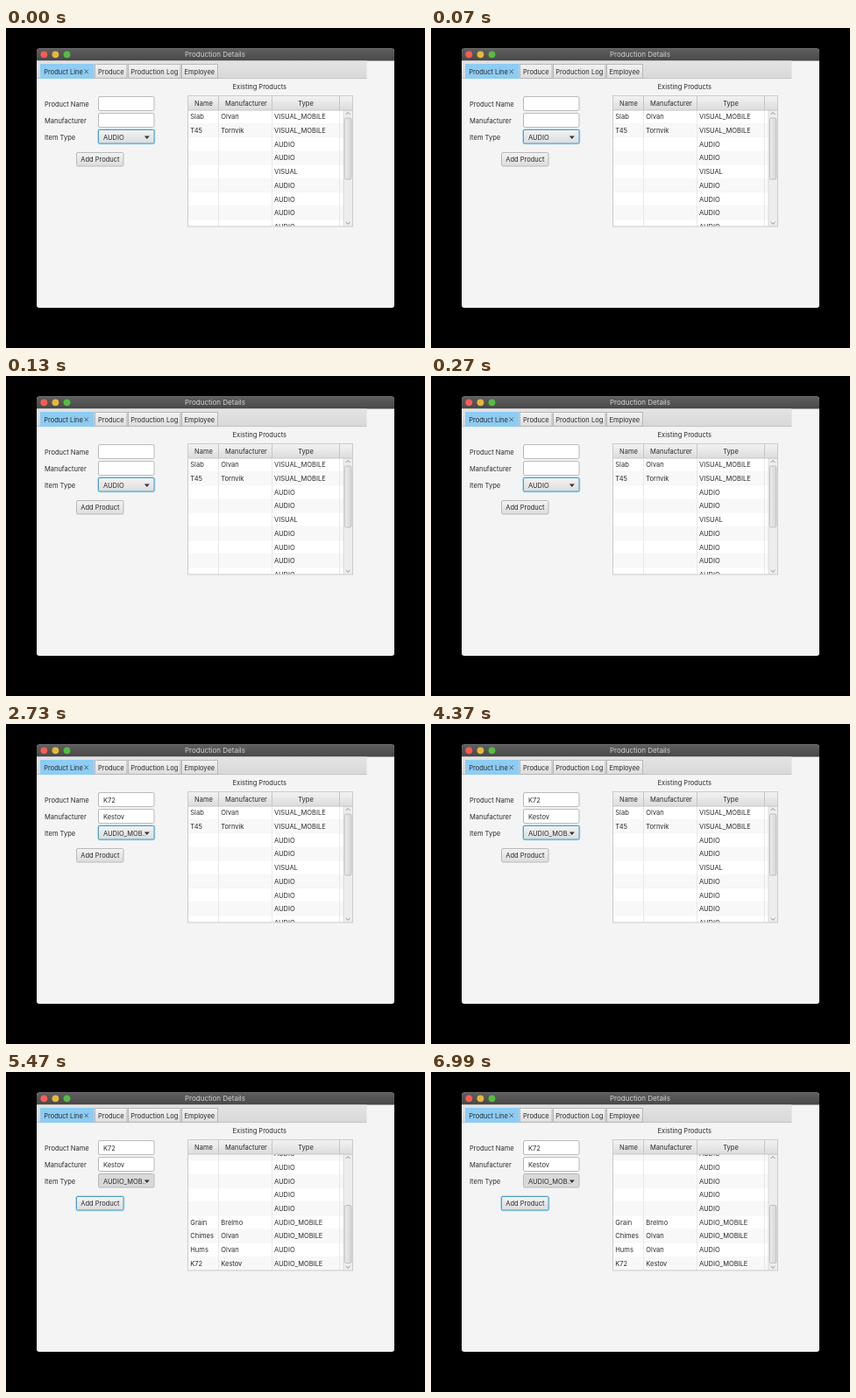
Recreate the animation shown at these times as an HTML page. Size 478x366 px, loop 8 s.

```html
<!DOCTYPE html>
<html lang="en">
<head>
<meta charset="utf-8">
<title>Production Details</title>
<style>
  html, body { margin: 0; width: 100%; height: 100%; overflow: hidden; background: #000; }
  svg { display: block; width: 478px; height: 366px; }
  text { font: 7.5px Inter, "Open Sans", sans-serif; fill: #2b2b2b; }
  .title { font-size: 8px; fill: #d2d2d2; }
  .mid { text-anchor: middle; }
</style>
</head>
<body>
<svg id="stage" viewBox="0 0 478 366">
  <defs>
    <linearGradient id="bar" x2="0" y2="1"><stop stop-color="#606060"/><stop offset="1" stop-color="#484848"/></linearGradient>
    <linearGradient id="strip" x2="0" y2="1"><stop stop-color="#e3e3e3"/><stop offset="1" stop-color="#d8d8d8"/></linearGradient>
    <linearGradient id="face" x2="0" y2="1"><stop stop-color="#f3f3f3"/><stop offset="1" stop-color="#dcdcdc"/></linearGradient>
    <linearGradient id="thumb"><stop stop-color="#ececec"/><stop offset="1" stop-color="#d6d6d6"/></linearGradient>
    <clipPath id="rowsClip"><rect x="207" y="94" width="188" height="133"/></clipPath>
    <clipPath id="win"><rect x="35" y="23.5" width="408" height="296.5" rx="3"/></clipPath>
  </defs>
  <g id="chrome" clip-path="url(#win)"></g>
  <g id="form"></g>
  <g id="table"></g>
</svg>
<script>
const LOOP = 8000;
const STATES = [
  { at: 0, name: "", maker: "", type: "AUDIO", focus: "combo", scroll: 0, thumb: [103, 70], count: 13 },
  { at: 2730, name: "K72", maker: "Kestov", type: "AUDIO_MOB..", focus: "combo", scroll: 0, thumb: [103, 70], count: 13 },
  { at: 5470, name: "K72", maker: "Kestov", type: "AUDIO_MOB..", focus: "button", scroll: 86.6, thumb: [152.5, 66], count: 14 }
];
const audio = ["", "", "AUDIO"];
const PRODUCTS = [
  ["Slab", "Olvan", "VISUAL_MOBILE"],
  ["T45", "Tornvik", "VISUAL_MOBILE"],
  audio, audio, ["", "", "VISUAL"], audio, audio, audio, audio, audio,
  ["Grain", "Brelmo", "AUDIO_MOBILE"],
  ["Chimes", "Olvan", "AUDIO_MOBILE"],
  ["Hums", "Olvan", "AUDIO"],
  ["K72", "Kestov", "AUDIO_MOBILE"]
];
const ROW = 15.7, TOP = 93.8;

const $ = id => document.getElementById(id);
const rect = (x, y, w, h, fill, extra = "") =>
  `<rect x="${x}" y="${y}" width="${w}" height="${h}" fill="${fill}" ${extra}/>`;
const path = (d, extra) => `<path d="${d}" ${extra}/>`;
// y is the vertical centre of the line
const text = (x, y, s, cls = "") => `<text x="${x}" y="${y + 2.7}" class="${cls}">${s}</text>`;
const edge = color => `stroke="${color}" stroke-width="1"`;

function control(x, y, w, h, fill, focused) {
  const glow = focused
    ? rect(x - .3, y - .3, w + .6, h + .6, "none", 'rx="2" stroke="#a9d9ee" stroke-width="2"') : "";
  return glow + rect(x, y, w, h, fill, `rx="1.5" ${edge(focused ? "#4d9fc4" : "#b9b9b9")}`);
}

function drawChrome() {
  const lights = ["#f95c54", "#e4b93a", "#55bd43"]
    .map((c, i) => `<circle cx="${43.3 + 13.1 * i}" cy="30.3" r="3.9" fill="${c}"/>`).join("");
  const tabs = [[101.5, 36.5, "Produce", 105], [139.5, 59.5, "Production Log", 142.3], [200.5, 41, "Employee", 203.5]]
    .map(([x, w, label, tx]) => rect(x, 41.5, w, 16, "url(#face)", edge("#b8b8b8")) + text(tx, 50, label)).join("");
  $("chrome").innerHTML =
    rect(35, 23, 408, 297, "#f4f4f4") +
    rect(35, 23, 408, 14.5, "url(#bar)") + lights +
    text(238.5, 30.5, "Production Details", "title mid") +
    rect(35, 37.5, 376.5, 20.5, "url(#strip)") +
    path("M35 57.6H411.5", edge("#c4c4c4")) +
    rect(39, 41, 61.5, 17, "#8dccf3") +
    text(43.2, 50, "Product Line") +
    path("M89.5 47.4l4.4 4.8m0 -4.8l-4.4 4.8", 'stroke="#4a5962" stroke-width=".9"') + tabs;
}

function drawForm(s) {
  const onCombo = s.focus === "combo";
  $("form").innerHTML =
    text(44, 87, "Product Name") + text(44, 106, "Manufacturer") + text(44, 125, "Item Type") +
    control(105.5, 78.5, 63.5, 16, "#fff") + text(111, 87, s.name) +
    control(105.5, 97.5, 63.5, 16, "#fff") + text(111, 106, s.maker) +
    control(105.5, 116.5, 63.5, 15.5, onCombo ? "url(#face)" : "#d9d9d9", onCombo) +
    text(111, 125, s.type) +
    path("M157.8 123.6h6l-3 3.4z", 'fill="#333"') +
    control(80.5, 142.5, 53.5, 15.5, "url(#face)", !onCombo) +
    text(85.3, 150.5, "Add Product");
}

function drawTable(s) {
  const rows = PRODUCTS.slice(0, s.count).map((cells, i) => {
    const y = TOP + i * ROW - s.scroll;
    return rect(207, y, 178, ROW, i % 2 ? "#f8f8f8" : "#fff") +
      path(`M207 ${y + ROW}H385`, 'stroke="#f0f0f0" stroke-width=".6"') +
      cells.map((c, k) => text([210.3, 245.3, 306][k], y + ROW / 2, c)).join("");
  }).join("");
  const [ty, th] = s.thumb;
  $("table").innerHTML =
    text(289.3, 67.5, "Existing Products", "mid") +
    rect(207, 77, 188.5, 150, "#fff") +
    `<g clip-path="url(#rowsClip)">${rows}` +
    path("M242.5 94V227M303.5 94V227M380.5 94V227", edge("#e8e8e8")) +
    rect(385, 94, 10, 133, "#ededed") +
    path("M385 94V227", 'stroke="#d0d0d0" stroke-width=".7"') +
    rect(386.3, ty, 7.6, th, "url(#thumb)", 'rx="1.5" stroke="#b5b5b5" stroke-width=".8"') +
    path("M387.7 99l2.4 -2.4l2.4 2.4M387.7 222l2.4 2.4l2.4 -2.4", 'fill="none" stroke="#777" stroke-width=".8"') +
    "</g>" +
    rect(207.5, 77.5, 188, 16.5, "url(#face)", edge("#c6c6c6")) +
    path("M242.5 78V94M303.5 78V94M380.5 78V94", edge("#c6c6c6")) +
    text(225.5, 86.3, "Name", "mid") + text(274, 86.3, "Manufacturer", "mid") + text(342, 86.3, "Type", "mid") +
    rect(207.5, 77.5, 188, 149.5, "none", edge("#cbcbcb"));
}

let shown;
function tick() {
  const t = performance.now() % LOOP;
  const state = STATES.filter(s => s.at <= t).pop();
  if (state !== shown) {
    shown = state;
    drawForm(state);
    drawTable(state);
  }
  requestAnimationFrame(tick);
}
drawChrome();
tick();
</script>
</body>
</html>
```
